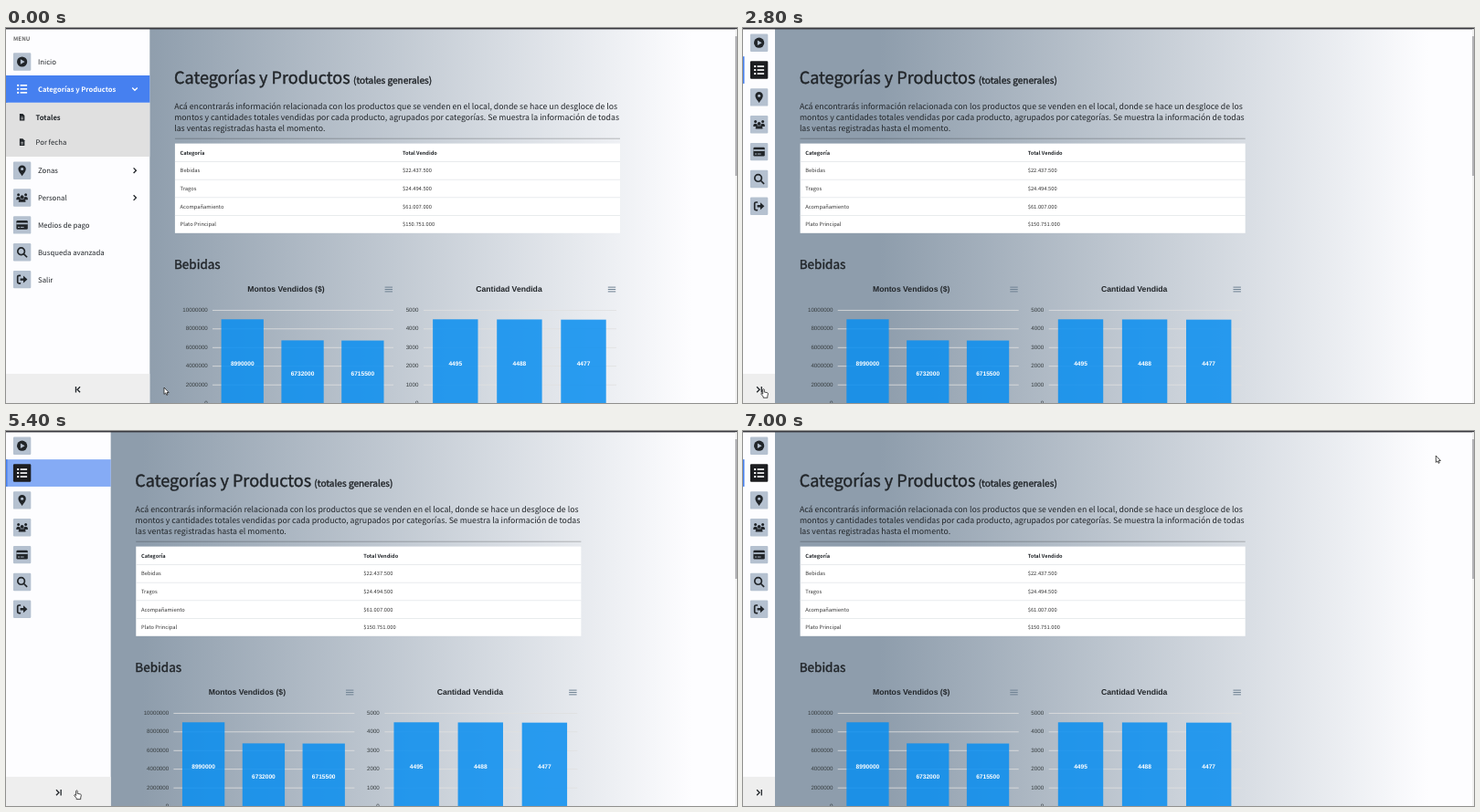
An HTML page that plays this animation: 800x411 px, repeating every 7.1 s.

```html
<!DOCTYPE html>
<html lang="es">
<head>
<meta charset="utf-8">
<title>Panel de ventas</title>
<style>
  html, body { margin: 0; width: 100%; height: 100%; overflow: hidden; background: #fff; }
  #stage { display: block; font-family: "Noto Sans CJK JP", "Noto Sans CJK SC", "Noto Sans CJK", sans-serif; fill: #212529; }
  text { white-space: pre; text-rendering: geometricPrecision; }
  .bold { font-weight: 700; }
  .medium { stroke: #212529; stroke-width: .4; }
  .chart { font-family: "Liberation Sans", Arial, sans-serif; }
  .line { fill: none; stroke: #212529; stroke-width: 1.3; }
  .white { fill: #fff; }
</style>
</head>
<body>
<svg id="stage" width="800" height="411" viewBox="0 0 800 411">
  <defs>
    <linearGradient id="sky" gradientUnits="userSpaceOnUse" x1="150" x2="750" y1="0" y2="0">
      <stop offset="0" stop-color="#8e9dac"/>
      <stop offset="1" stop-color="#fdfdff"/>
    </linearGradient>
  </defs>
  <rect width="800" height="411" fill="url(#sky)"/>
  <g id="content"></g>
  <svg id="side" height="411">
    <rect width="160" height="411" fill="#fdfdff"/>
    <rect y="379" width="160" height="32" fill="#eee"/>
    <g id="menu"></g>
    <g id="toggle" class="line"><path id="arrow"/></g>
  </svg>
  <rect width="800" height="1.4" fill="#38383e"/>
  <rect x="798" y="1.4" width="2" height="410" fill="#f1f1f1"/>
  <rect x="798" y="9" width="2" height="153" fill="#b4b4b8"/>
  <g id="cursor" fill="#fff" stroke="#222" stroke-width=".8" stroke-linejoin="round">
    <path id="pointer" d="M0 0V7.4L1.7 5.9 2.8 8.3 4 7.8 3 5.5H5.2Z"/>
    <path id="hand" d="M-.8 .5Q0-.6.8 .5V3.4L4 4Q5 4.3 4.9 5.3L4.3 8V9.6H-.3V8.4L-2.8 5.4Q-2.6 4.3-1.6 4.8L-.8 5.5Z"/>
  </g>
</svg>
<script>
const $ = id => document.getElementById(id);
const LOOP = 7100, OPEN = 157.3, CLOSED = 35, SLIDE = 300, SUB = 59.5;

const text = (x, y, size, str, attrs = '') =>
  `<text x="${x}" y="${y}" font-size="${size}" ${attrs}>${str}</text>`;
const rect = (x, y, w, h, attrs = '') =>
  `<rect x="${x}" y="${y}" width="${w}" height="${h}" ${attrs}/>`;

// Page content, laid out for the open sidebar
const BASE = 411.2, STEP = 20.45;
function chart({ title, mid, menuX, axisX, gridX, gridEnd, unit, bars, barX, pitch, barW }) {
  let out = text(mid, 289, 8.64, title, 'class="bold" text-anchor="middle"');
  for (let i = 0; i < 3; i++) out += rect(menuX, 283.6 + i * 2.4, 8.4, 1, 'fill="#6e8192"');
  for (let i = 0; i <= 5; i++) {
    const y = BASE - i * STEP;
    out += rect(gridX, y, gridEnd - gridX, .8, 'fill="#e0e0e0"');
    out += text(axisX, y + 1.8, 6.2, i * unit, 'text-anchor="end" fill="#373d3f"');
  }
  bars.forEach((value, i) => {
    const x = barX + i * pitch, top = BASE - value / unit * STEP;
    out += rect(x, top, barW, 415 - top, 'fill="#0a8ef0" fill-opacity=".86"');
    out += text(x + barW / 2, (top + 414) / 2 + 3.1, 6.6, value, 'class="bold white" text-anchor="middle"');
  });
  return `<g class="chart">${out}</g>`;
}

const intro = [
  'Acá encontrarás información relacionada con los productos que se venden en el local, donde se hace un desgloce de los',
  'montos y cantidades totales vendidas por cada producto, agrupados por categorías. Se muestra la información de todas',
  'las ventas registradas hasta el momento.'
];
const rows = [
  ['Categoría', 'Total Vendido'], ['Bebidas', '$22.437.500'], ['Tragos', '$24.494.500'],
  ['Acompañamiento', '$61.007.000'], ['Plato Principal', '$150.751.000']
];
$('content').innerHTML =
  text(184, 61.3, 18.05, 'Categorías y Productos', 'class="medium"') +
  text(380, 61.3, 10.05, '(totales generales)', 'class="medium"') +
  intro.map((str, i) => text(184.2, 89 + i * 12.2, 8.75, str)).join('') +
  rect(184.9, 120.8, 487.1, .7, 'fill="#000" fill-opacity=".35"') +
  rect(184.9, 126.6, 487.1, 98.2, 'fill="#fff"') +
  rows.map(([name, total], i) => {
    const y = 138.7 + i * 19.65, style = i ? 'fill="#333"' : 'class="bold"', size = i ? 5.77 : 5.65;
    return (i ? rect(184.9, y - 12.2, 487.1, .7, 'fill="#dee2e6"') : '') +
      text(190.6, y, size, name, style) + text(434, y, size, total, style);
  }).join('') +
  text(184, 263.7, 13.5, 'Bebidas', 'class="medium"') +
  chart({ title: 'Montos Vendidos ($)', mid: 306.5, menuX: 414.6, axisX: 220.8, gridX: 226, gridEnd: 424,
    unit: 2000000, bars: [8990000, 6732000, 6715500], barX: 235.6, pitch: 65.8, barW: 46.3 }) +
  chart({ title: 'Cantidad Vendida', mid: 550.5, menuX: 658.8, axisX: 451.4, gridX: 457, gridEnd: 668,
    unit: 1000, bars: [4495, 4488, 4477], barX: 467.1, pitch: 70.1, barW: 49.4 });

// Icons, centred on 0,0
const icons = {
  play: '<circle r="5.6"/><path d="M-1.7-2.8V2.8L3 0Z" fill="#b5c1d0"/>',
  list: [-4, 0, 4].map(y => rect(-5.5, y - 1, 2, 2) + rect(-2, y - .8, 7.5, 1.6)).join(''),
  pin: '<path d="M0 6C-2 3-4.2 1-4.2-1.6A4.2 4.2 0 0 1 4.2-1.6C4.2 1 2 3 0 6Z"/><circle cy="-1.6" r="1.5" fill="#b5c1d0"/>',
  people: [[-4, -3.3, 1.5, 2.3], [4, -3.3, 1.5, 2.3], [0, -.8, 1.9, 3.8]].map(([x, y, r, w]) =>
    `<circle cx="${x}" cy="${y}" r="${r}"/><path d="M${x - w} ${y + 5.6}v-1.2a${w} 2.2 0 0 1 ${2 * w} 0v1.2Z"/>`).join(''),
  card: rect(-6.2, -4.8, 12.4, 9.6, 'rx="1.2"') + rect(-6.2, -2.4, 12.4, 1.7, 'fill="#b5c1d0"') +
    rect(-4.6, 2, 2.2, .9, 'fill="#b5c1d0"') + rect(-1.6, 2, 3.6, .9, 'fill="#b5c1d0"'),
  search: '<g class="line" style="stroke-width:1.7"><circle cx="-1" cy="-1" r="3.8"/><path d="M1.8 1.8L5.5 5.5"/></g>',
  exit: '<path class="line" style="stroke-width:1.7" d="M-1.5-4.3H-3.5Q-4.9-4.3-4.9-3V3Q-4.9 4.3-3.5 4.3H-1.5"/>' +
    '<path d="M-2-1.2H1.4V-4L5.8 0 1.4 4V1.2H-2Z"/>',
  file: '<path d="M-2.6-3.8H.8L2.8-1.8V3.8H-2.6Z"/><path d="M-1.3 .2H1.5M-1.3 1.9H1.5" stroke="#e0e0e0" stroke-width=".7"/>'
};
const items = [
  ['play', 'Inicio'], ['list', 'Categorías y Productos', 'down'], ['pin', 'Zonas', 'right'],
  ['people', 'Personal', 'right'], ['card', 'Medios de pago'], ['search', 'Busqueda avanzada'], ['exit', 'Salir']
];
const chevrons = { down: 'M-2.8-1.4L0 1.4 2.8-1.4', right: 'M-1.4-2.8L1.4 0-1.4 2.8' };

$('menu').innerHTML =
  text(8, 14.4, 6.1, 'MENU', 'class="label bold" fill="#666" letter-spacing=".1"') +
  `<svg id="sub" class="label" y="81.8" width="160">${rect(0, 0, 160, SUB, 'fill="#e0e0e0"')}` +
  ['Totales', 'Por fecha'].map((str, i) => `<g transform="translate(17.5 ${16 + i * 27.3})">${icons.file}</g>` +
    text(32.6, 19 + i * 27.3, 7.7, str, i ? '' : 'class="bold"')).join('') + '</svg>' +
  items.map(([icon, label, chevron], i) => {
    const active = i === 1;
    return `<g class="item ${active ? 'white' : ''}">` +
      (active ? rect(0, -14.9, 160, 29.8, 'id="glow" fill="#4680f0"') + rect(0, -14.9, 1.5, 29.8, 'fill="#4680f0"') : '') +
      rect(7.9, -9.7, 19.4, 19.4, `rx="1.2" ${active ? 'id="badge" fill="#1c1d20"' : 'fill="#b5c1d0"'}`) +
      `<g transform="translate(17.6 0)">${icons[icon]}</g>` +
      text(35, 2.9, active ? 7.55 : 7.77, label, `class="label ${active ? 'bold' : ''}"`) +
      (chevron ? `<g class="chevron label"><path class="line" d="${chevrons[chevron]}" ${active ? 'style="stroke:#fff"' : ''}/></g>` : '') +
      '</g>';
  }).join('');

const itemNodes = [...document.querySelectorAll('.item')];
const labels = [...document.querySelectorAll('.label')];
const chevronNodes = [...document.querySelectorAll('.chevron')];

// CSS "ease": cubic-bezier(.25, .1, .25, 1)
function ease(x) {
  if (x <= 0) return 0;
  if (x >= 1) return 1;
  let lo = 0, hi = 1;
  for (let i = 0; i < 24; i++) {
    const u = (lo + hi) / 2;
    if (.75 * u * (1 - u) + u ** 3 < x) lo = u; else hi = u;
  }
  return .3 * lo * (1 - lo) ** 2 + 3 * lo * lo * (1 - lo) + lo ** 3;
}

const clicks = [1687, 3265, 5334];
const path = [
  [0, 173, 394], [100, 173, 394], [700, 77.5, 397], [2000, 77.5, 397], [2600, 22.5, 396],
  [3100, 22.5, 395], [4000, 23, 394.5], [4600, 78.5, 394], [6350, 76, 394], [7000, 758.3, 27], [LOOP, 758.3, 27]
];
function mouseAt(t) {
  const i = path.findIndex(p => p[0] > t);
  const [t0, x0, y0] = path[i - 1], [t1, x1, y1] = path[i];
  const u = (t - t0) / (t1 - t0), s = u * u * (3 - 2 * u);
  return [x0 + (x1 - x0) * s, y0 + (y1 - y0) * s];
}

const show = (node, on) => node.setAttribute('visibility', on ? 'visible' : 'hidden');
const move = (node, x, y) => node.setAttribute('transform', `translate(${x} ${y})`);

function draw(t) {
  const past = clicks.filter(c => c <= t);
  const open = past.length % 2 === 0;
  const since = past.length ? t - past[past.length - 1] : Infinity;
  const p = ease(since / SLIDE);
  const amount = open ? p : 1 - p;
  const width = CLOSED + (OPEN - CLOSED) * amount;
  const subHeight = open ? SUB * ease((since - 22) / SLIDE) : 0;

  move($('content'), width - OPEN, 0);
  $('side').setAttribute('width', width);
  $('sub').setAttribute('height', subHeight);
  $('glow').setAttribute('opacity', amount);
  show($('badge'), !open);
  labels.forEach(node => show(node, open));
  itemNodes.forEach((node, i) => move(node, 0, (open ? 37 : 16.2) + i * 29.85 + (i > 1 ? subHeight : 0)));
  chevronNodes.forEach(node => move(node, width - 16.3, 0));
  move($('toggle'), width / 2, 396.3);
  $('arrow').setAttribute('d', open ? 'M-2.2-3.2V3.2M2.4-3L-.6 0 2.4 3' : 'M2.8-3.2V3.2M-2.4-3L.6 0-2.4 3');

  const [x, y] = mouseAt(t), hover = x < width && y > 379;
  move($('cursor'), x, y);
  show($('hand'), hover);
  show($('pointer'), !hover);
}

const start = performance.now();
function tick() {
  draw((performance.now() - start) % LOOP);
  requestAnimationFrame(tick);
}
tick();
</script>
</body>
</html>
```
